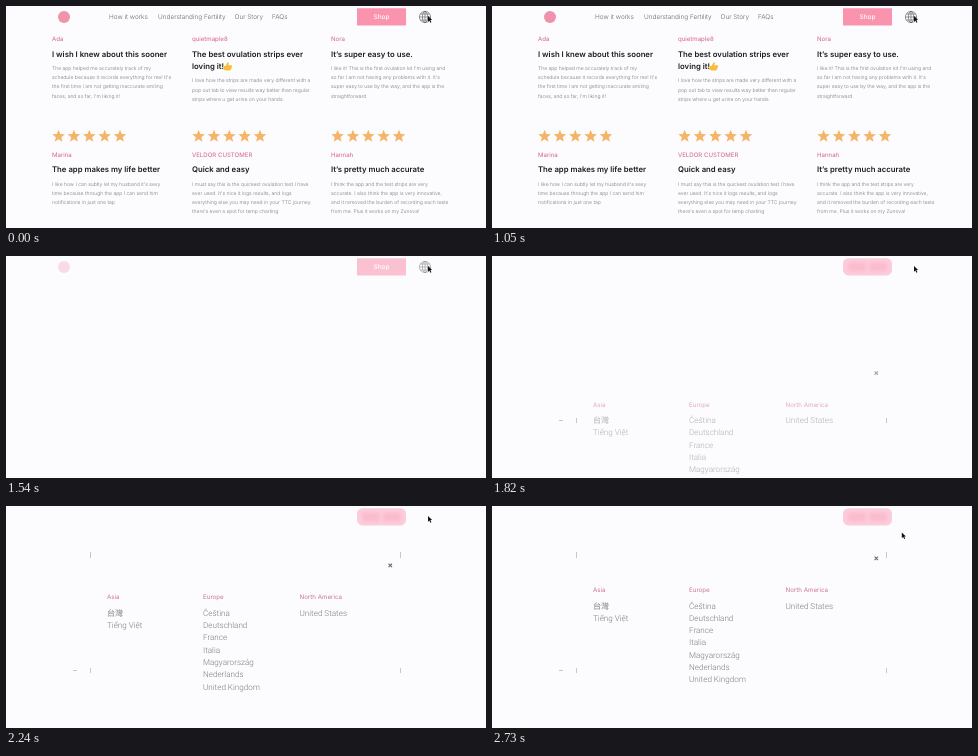
Write an HTML page that moves like this. It is 480 px wide and 222 px high and loops after 2800 ms.

```html
<!DOCTYPE html>
<html lang="en">
<head>
<meta charset="utf-8">
<title>Reviews and region picker</title>
<style>
  html, body { margin: 0; width: 100%; height: 100%; overflow: hidden; background: #fcfbfe; }
  svg { display: block; width: 100%; height: 100%; }
  text { font-family: Inter, "Noto Sans", sans-serif; text-rendering: geometricPrecision; white-space: pre; }
  .nav { font-size: 6.45px; font-weight: 300; fill: #666; }
  .name { font-size: 6.1px; font-weight: 400; fill: #d4628b; }
  .title { font-size: 7.75px; font-weight: 600; fill: #1c1c1c; }
  .body { font-size: 5.06px; font-weight: 300; fill: #777; }
  .shop { font-size: 6.5px; font-weight: 500; fill: #fff; text-anchor: middle; }
  .region { font-size: 6.2px; font-weight: 400; fill: #cf7398; }
  .country { font-family: Roboto, "Noto Sans CJK TC", "Noto Sans CJK", sans-serif; font-size: 8.1px; font-weight: 300; fill: #7c7c7c; }
</style>
</head>
<body>
<svg id="stage" viewBox="0 0 480 222" xmlns="http://www.w3.org/2000/svg">
  <filter id="blur" x="-20%" y="-50%" width="140%" height="200%">
    <feGaussianBlur stdDeviation="1.4"/>
  </filter>
  <rect width="480" height="222" fill="#fcfbfe"/>
  <g id="page"></g>
  <circle id="logo" cx="58" cy="11" r="6" fill="#ee93aa"/>
  <rect id="plate" x="351" y="2.2" width="49" height="17.2" fill="#fa93ae"/>
  <g id="smear" fill="#f9a9c0" filter="url(#blur)">
    <rect x="356" y="6.5" width="18" height="9" rx="3"/>
    <rect x="377" y="6.5" width="18" height="9" rx="3"/>
  </g>
  <text id="shop" class="shop" x="375.5" y="13.4">Shop</text>
  <g id="globe" fill="none" stroke="#555" stroke-width=".6">
    <circle cx="419" cy="11" r="5.6"/>
    <ellipse cx="419" cy="11" rx="2.6" ry="5.6"/>
    <path d="M413.4 11h11.2M419 5.4v11.2M414.3 8h9.4M414.3 14h9.4"/>
  </g>
  <g fill="none" stroke="#b9b9bd" stroke-width=".8">
    <path id="topTicks" d="M84.5 46v6M394.5 46v6"/>
    <path id="lowTicks" d="M84.5 162v5M394.5 162v5M67 164.5h4"/>
  </g>
  <g id="modal"></g>
  <path id="cursor" d="M0 0V5.6L1.4 4.4 2.4 6.6 3.4 6.1 2.4 4H4.1Z" fill="#111"/>
</svg>
<script>
const LOOP = 2800, STEP = 70;
const NS = "http://www.w3.org/2000/svg";
const $ = id => document.getElementById(id);

function add(parent, tag, attrs, content) {
  const el = document.createElementNS(NS, tag);
  for (const key in attrs) el.setAttribute(key, attrs[key]);
  if (content) el.textContent = content;
  parent.appendChild(el);
}

function lines(parent, cls, x, y, gap, list) {
  list.forEach((s, i) => add(parent, "text", { class: cls, x, y: y + i * gap }, s));
}

function star(cx, cy) {
  const points = Array.from({ length: 10 }, (_, i) => {
    const r = i % 2 ? 2.9 : 6.6, a = (i / 5 - 0.5) * Math.PI;
    return (cx + r * Math.cos(a)).toFixed(2) + "," + (cy + r * Math.sin(a)).toFixed(2);
  });
  add($("page"), "polygon", { points: points.join(" "), fill: "#f5b566" });
}

const columns = [46, 186, 325];
const reviews = [
  ["Ada", ["I wish I knew about this sooner"], [
    "The app helped me accurately track of my",
    "schedule because it records everything for me! It's",
    "the first time I am not getting inaccurate smiling",
    "faces, and so far, I'm liking it!"]],
  ["quietmaple8", ["The best ovulation strips ever", "loving it!"], [
    "I love how the strips are made very different with a",
    "pop out tab to view results way better than regular",
    "strips where u get urine on your hands."]],
  ["Nora", ["It’s super easy to use."], [
    "I like it! This is the first ovulation kit I'm using and",
    "so far I am not having any problems with it. It's",
    "super easy to use by the way, and the app is the",
    "straightforward"]],
  ["Marina", ["The app makes my life better"], [
    "I like how I can subtly let my husband it's sexy",
    "time because through the app I can send him",
    "notifications in just one tap"]],
  ["VELDOR CUSTOMER", ["Quick and easy"], [
    "I must say this is the quickest ovulation test I have",
    "ever used. It's nice it logs results, and logs",
    "everything else you may need in your TTC journey.",
    "there's even a spot for temp charting"]],
  ["Hannah", ["It’s pretty much accurate"], [
    "I think the app and the test strips are very",
    "accurate. I also think the app is very innovative,",
    "and it removed the burden of recording each tests",
    "from me. Plus it works on my Zunova!"]]
];

function buildPage() {
  const page = $("page");
  [[103, "How it works"], [152, "Understanding Fertility"], [228.5, "Our Story"], [266, "FAQs"]]
    .forEach(([x, s]) => add(page, "text", { class: "nav", x, y: 12.8 }, s));
  reviews.forEach(([name, title, body], i) => {
    const x = columns[i % 3], y = i < 3 ? 0 : 115.6;
    add(page, "text", { class: "name", x, y: 35.2 + y }, name);
    lines(page, "title", x, 50.8 + y, 12.6, title);
    lines(page, "body", x, 64 + y + (title.length - 1) * 12.4, 9.2, body);
    if (y) for (let n = 0; n < 5; n++) star(x + 6.6 + n * 15.35, 130.4);
  });
  // thumbs-up after the second title
  add(page, "path", {
    d: "M217.5 60h2l2-3.5q1.5-.6 1.3 1l-.4 1.7h3q1 .2.6 1.2l-1 3.2q-.3.9-1.3.9h-3.7l-2.5-.7Z",
    fill: "#f8bd3c"
  });
}

function buildModal() {
  const modal = $("modal");
  add(modal, "path", { d: "M382.6 50.7l3.4 3.4m0-3.4l-3.4 3.4", stroke: "#6c6c6c", "stroke-width": 1.1 });
  [
    [101, "Asia", ["台灣", "Tiếng Việt"]],
    [197, "Europe", ["Čeština", "Deutschland", "France", "Italia", "Magyarország", "Nederlands", "United Kingdom"]],
    [293.5, "North America", ["United States"]]
  ].forEach(([x, region, list]) => {
    add(modal, "text", { class: "region", x, y: 86.4 }, region);
    lines(modal, "country", x, 102.5, 12.33, list);
  });
}

const ramp = (t, from, to) => Math.min(1, Math.max(0, (t - from) / (to - from)));
const mix = (a, b, p) => a + (b - a) * p;
const fade = (id, value) => $(id).setAttribute("opacity", value);

function draw(t) {
  const page = 1 - ramp(t, 1330, 1540) ** 2;
  const soften = ramp(t, 1540, 1820);
  fade("page", page);
  fade("logo", Math.max(page, 0.3) * (1 - soften));
  fade("globe", Math.max(page, 0.65) * (1 - soften));

  // the button stays behind as a soft pink patch
  fade("plate", Math.max(page, 0.55) - 0.1 * soften);
  $("plate").setAttribute("rx", mix(0.6, 5.5, soften));
  fade("smear", 0.45 * soften);
  fade("shop", 1 - soften);

  fade("lowTicks", t >= 1820 ? 1 : 0);
  fade("topTicks", t >= 2240 ? 1 : 0);

  const rise = Math.pow(Math.max(0, 2517 - t) * 0.00815, 2.4);
  $("modal").setAttribute("transform", `translate(0 ${rise.toFixed(2)})`);
  fade("modal", ramp(t, 1610, 1960));

  const p = ramp(t, 2450, 2730);
  const move = p * p * (3 - 2 * p);
  $("cursor").setAttribute("transform", `translate(${mix(422, 409.8, move)} ${mix(10.1, 26.5, move)})`);
}

buildPage();
buildModal();
const start = performance.now();
function tick() {
  const t = (performance.now() - start) % LOOP;
  draw(Math.floor(t / STEP) * STEP);
  requestAnimationFrame(tick);
}
draw(0);
requestAnimationFrame(tick);
</script>
</body>
</html>
```
